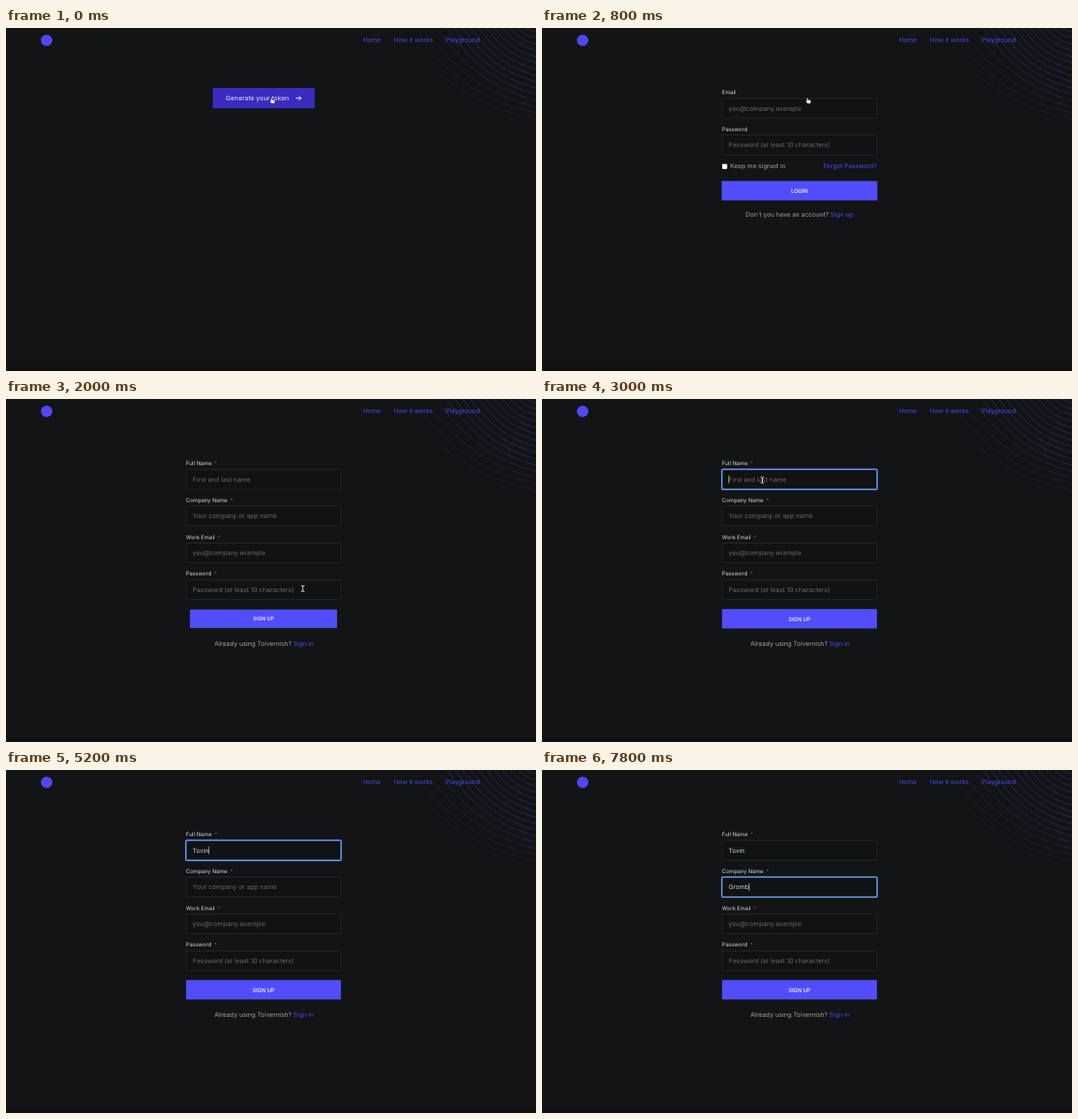
An HTML page that plays this animation: 600 by 389 pixels, repeating every 8000 ms.

```html
<!DOCTYPE html>
<html lang="en">
<head>
<meta charset="utf-8">
<title>Sign-up flow</title>
<style>
  html, body { margin: 0; height: 100%; overflow: hidden; background: #121415; }
  svg { display: block; width: 100vw; height: 100vh; }
  text { font: 7.2px Inter, sans-serif; text-rendering: geometricPrecision; white-space: pre; }
  .link { fill: #5148f0; }
  .label { font-size: 6.2px; fill: #d9dadc; }
  .star { fill: #a53a47; }
  .hint { font-size: 7.32px; fill: #68696d; }
  .value { fill: #d0d1d3; }
  .note { fill: #a3a4a8; }
  .action { font-size: 6.2px; font-weight: 500; fill: #fff; text-anchor: middle; }
  .end { text-anchor: end; }
  .field { fill: #111213; stroke: #292a2d; stroke-width: .8; }
</style>
</head>
<body>
<svg viewBox="0 0 600 389">
  <defs>
    <linearGradient id="fade" gradientUnits="userSpaceOnUse" x1="455" y1="0" x2="600" y2="0">
      <stop offset="0" stop-color="#30368c" stop-opacity=".1"/>
      <stop offset=".35" stop-color="#30368c" stop-opacity=".85"/>
      <stop offset="1" stop-color="#303a80" stop-opacity=".8"/>
    </linearGradient>
  </defs>
  <rect width="600" height="389" fill="#121415"/>
  <rect y="383" width="600" height="6" fill="#101112"/>
  <g id="waves" fill="none" stroke="url(#fade)" stroke-width=".7"/>
  <circle cx="46" cy="14" r="6.5" fill="#5148f0"/>
  <text class="link" x="404" y="15.8">Home</text>
  <text class="link" x="439" y="15.8">How it works</text>
  <text class="link" x="498" y="15.8">Playground</text>

  <g id="start">
    <rect x="234" y="68" width="115.5" height="23" fill="#392cbf"/>
    <text x="249" y="82.2" fill="#f0f0ff" letter-spacing=".11">Generate your token</text>
    <path d="M328 79.6h6M331.3 76.9l2.7 2.7l-2.7 2.7" fill="none" stroke="#fff" stroke-width=".9"/>
  </g>

  <g id="login">
    <rect x="204" y="154.3" width="5.6" height="5.6" rx=".8" fill="#fff"/>
    <text class="note" x="213" y="159.4">Keep me signed in</text>
    <text class="link end" x="379.3" y="159.4">Forgot Password?</text>
    <g id="enter">
      <rect x="-87.7" y="-11" width="175.4" height="22" rx=".8" fill="#514dfb"/>
      <text class="action" y="2.3">LOGIN</text>
    </g>
    <text class="note end" x="324.7" y="214.4">Don't you have an account?</text>
    <text class="link" x="326.6" y="214.4">Sign up</text>
  </g>

  <g id="signup">
    <g id="submit">
      <rect x="-87.7" y="-11" width="175.4" height="22" rx=".8" fill="#514dfb"/>
      <text class="action" y="2.3">SIGN UP</text>
    </g>
    <text class="note end" x="323.3" y="279.5">Already using Tolvernish?</text>
    <text class="link" x="325.3" y="279.5">Sign in</text>
  </g>

  <g id="focus" fill="none">
    <rect x="203.6" y="79.7" width="175.8" height="22.8" rx="1" stroke="#2f62b4" stroke-width="1.8"/>
    <rect x="203.6" y="79.7" width="175.8" height="22.8" rx="1" stroke="#86b4fb" stroke-width=".9"/>
  </g>
  <rect id="caret" width=".6" height="8.6" fill="#e4e4e6"/>

  <g id="pointer">
    <path id="hand" fill="#fff" stroke="#111" stroke-width=".5" stroke-linejoin="round"
      d="M-1.6-3.2q.6-.7 1.1 0l.8 2l2.2.5q1 .3.9 1.3l-.4 2.6h-3.3l-2.3-2.8q0-.9 1-.5l.6.4z"/>
    <g id="beam" fill="none" stroke-linecap="round">
      <path d="M-1.6-3.4Q0-3.4 0-2.5Q0-3.4 1.6-3.4M0-2.6V2.6M-1.6 3.4Q0 3.4 0 2.5Q0 3.4 1.6 3.4" stroke="#000" stroke-width="1.9"/>
      <path d="M-1.6-3.4Q0-3.4 0-2.5Q0-3.4 1.6-3.4M0-2.6V2.6M-1.6 3.4Q0 3.4 0 2.5Q0 3.4 1.6 3.4" stroke="#fff" stroke-width=".9"/>
    </g>
  </g>
</svg>
<script>
const LOOP = 8000, STEP = 200, PITCH = 41.7, BLINK = 500;
const LOGIN_AT = 600, SIGNUP_AT = 2000;
const $ = id => document.getElementById(id);
const show = (id, on) => $(id).setAttribute('visibility', on ? 'inherit' : 'hidden');
const place = (id, transform) => $(id).setAttribute('transform', transform);

function add(parent, tag, attrs, content = '') {
  const node = document.createElementNS('http://www.w3.org/2000/svg', tag);
  for (const key in attrs) node.setAttribute(key, attrs[key]);
  node.textContent = content;
  parent.append(node);
  return node;
}

function addField(page, row, label, hint, required) {
  const y = 80 + row * PITCH;
  const caption = add(page, 'text', { class: 'label', x: 203.8, y: y - 4.8 }, label);
  if (required) add(caption, 'tspan', { class: 'star', dx: 1.4 }, ' *');
  add(page, 'rect', { class: 'field', x: 203.9, y, width: 175.2, height: 22.2 });
  return add(page, 'text', { class: 'hint', x: 211.3, y: y + 13.5 }, hint);
}

// Contour lines: steep on the left, flattening towards the right edge.
for (let i = 0; i < 15; i++) {
  const x = 463 + i * 9, y = Math.max(0, 25 - i * 7), endY = 103.5 - i * 7.1;
  const w = 600 - x, h = endY - y;
  add($('waves'), 'path', {
    d: `M${x} ${y}C${x + w * .25} ${y + h * .45} ${x + w * .49} ${y + h * .81} 600 ${endY}`,
    opacity: Math.min(1, .5 + i * .1)
  });
}

const mail = 'you@company.example', secret = 'Password (at least 10 characters)';
addField($('login'), 0, 'Email', mail);
addField($('login'), 1, 'Password', secret);

const inputs = [
  { label: 'Full Name', hint: 'First and last name', word: 'Tovin',
    focusAt: 2800, keys: [3600, 3800, 4600, 4800, 5000] },
  { label: 'Company Name', hint: 'Your company or app name', word: 'Gromb',
    focusAt: 5400, keys: [6400, 6600, 7000, 7200, 7600] }
];
inputs.forEach((input, row) => {
  input.node = addField($('signup'), row, input.label, input.hint, true);
});
addField($('signup'), 2, 'Work Email', mail, true);
addField($('signup'), 3, 'Password', secret, true);

// Pointer stops: time, x, y.
const route = [[0, 301, 82.5], [800, 301, 82.5], [1200, 338, 222], [1400, 336, 215],
  [2200, 336, 215], [2800, 249.5, 92], [LOOP, 249.5, 92]];

function pointerAt(t) {
  const next = route.findIndex(stop => stop[0] > t);
  const [t0, x0, y0] = route[next - 1], [t1, x1, y1] = route[next];
  const p = (t - t0) / (t1 - t0), e = p * p * (3 - 2 * p);
  return [x0 + (x1 - x0) * e, y0 + (y1 - y0) * e];
}

// A new button grows from 95 %, overshoots a little and settles.
function entryScale(age) {
  return 1 - .05 * Math.exp(-age / 90) * Math.cos(age / 75);
}

function draw(t) {
  show('start', t < LOGIN_AT);
  show('login', t >= LOGIN_AT && t < SIGNUP_AT);
  show('signup', t >= SIGNUP_AT);
  place('enter', `translate(291.5 184.5) scale(${entryScale(Math.max(0, t - LOGIN_AT))})`);
  place('submit', `translate(291.5 249.3) scale(${entryScale(Math.max(0, t - SIGNUP_AT))})`);

  for (const { node, hint, word, keys } of inputs) {
    const typed = word.slice(0, keys.filter(k => k <= t).length);
    node.textContent = typed || hint;
    node.setAttribute('class', typed ? 'value' : 'hint');
  }

  const row = t >= inputs[1].focusAt ? 1 : 0, { node, focusAt, keys } = inputs[row];
  const focused = t >= focusAt;
  const lastInput = Math.max(focusAt, ...keys.filter(k => k <= t));
  const textWidth = t >= keys[0] ? node.getComputedTextLength() : 0;
  show('focus', focused);
  place('focus', `translate(0 ${row * PITCH})`);
  show('caret', focused && Math.floor((t - lastInput) / BLINK) % 2 === 0);
  place('caret', `translate(${211.2 + textWidth} ${86.8 + row * PITCH})`);

  // Typing hides the pointer.
  show('pointer', t < inputs[0].keys[0]);
  place('pointer', `translate(${pointerAt(t)})`);
  $('hand').style.display = t < SIGNUP_AT ? '' : 'none';
  $('beam').style.display = t < SIGNUP_AT ? 'none' : '';
}

const began = performance.now();
function frame() {
  const t = (performance.now() - began) % LOOP;
  draw(Math.floor(t / STEP) * STEP);
  requestAnimationFrame(frame);
}
frame();
</script>
</body>
</html>
```
